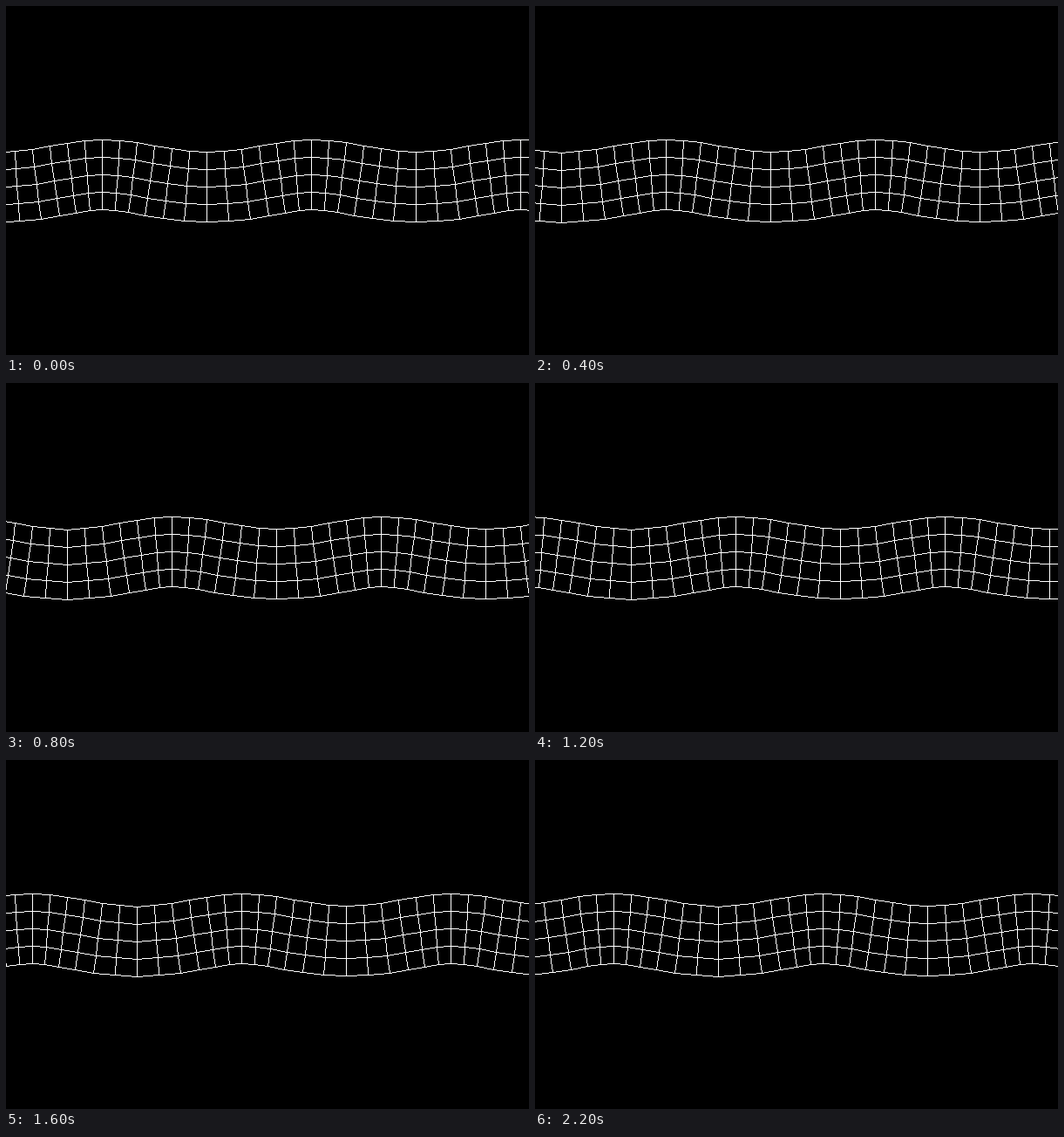
An HTML page with a canvas for the animation above (2400 ms loop, 600 by 400 pixels).

```html
<!DOCTYPE html>
<html lang="en">
<head>
<meta charset="utf-8">
<title>Wave grid</title>
<style>
  html, body { margin: 0; width: 100%; height: 100%; overflow: hidden; background: #000; }
  canvas { display: block; }
</style>
</head>
<body>
<canvas id="stage" width="600" height="400"></canvas>
<script>
const ctx = document.getElementById('stage').getContext('2d');
const CELL = 20, ROWS = 4, COLS = 34;
const STEP_MS = 200, STEPS = 12;
const RISE = 8, SWAY = 3;
const TURN = 3.14159 / 6; // just under 30 degrees, so whole offsets truncate evenly

// Every row rises alike; the sideways sway grows with depth.
function point(col, row, step) {
  const angle = (col - 1 - step) * TURN;
  return [
    (col - 1.5) * CELL + Math.trunc(SWAY * row * Math.sin(angle)),
    160 + row * CELL + Math.trunc(RISE * Math.cos(angle))
  ];
}

const roundHalfDown = v => Math.ceil(v - 0.5);

// One-pixel line without smoothing.
function line([x0, y0], [x1, y1]) {
  const dx = x1 - x0, dy = y1 - y0;
  const n = Math.max(Math.abs(dx), Math.abs(dy));
  for (let i = 0; i <= n; i++) {
    ctx.fillRect(roundHalfDown(x0 + dx * i / n), roundHalfDown(y0 + dy * i / n), 1, 1);
  }
}

function draw(step) {
  ctx.fillStyle = '#000';
  ctx.fillRect(0, 0, 600, 400);
  ctx.fillStyle = '#fff';
  for (let row = 0; row <= ROWS; row++) {
    for (let col = 0; col < COLS; col++) {
      const p = point(col, row, step);
      line(p, point(col + 1, row, step));
      if (row < ROWS) line(p, point(col, row + 1, step));
    }
  }
}

const start = performance.now();
let shown = -1;

function tick() {
  const step = Math.floor((performance.now() - start) / STEP_MS) % STEPS;
  if (step !== shown) draw(shown = step);
  requestAnimationFrame(tick);
}
tick();
</script>
</body>
</html>
```
